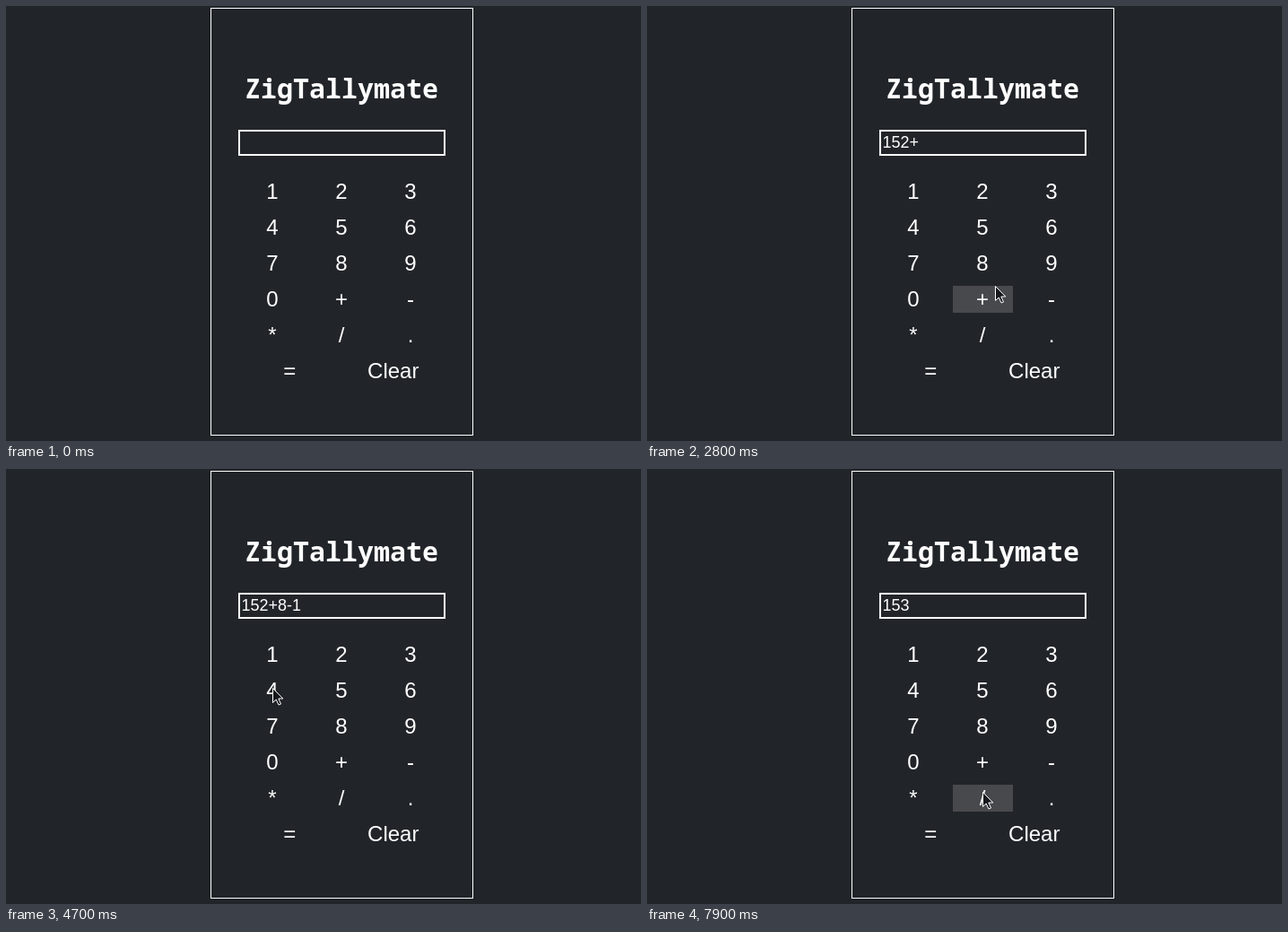
An HTML page for the animation above (8 s loop, 708x485 px).

```html
<!DOCTYPE html>
<html lang="en">
<head>
<meta charset="utf-8">
<title>Calculator</title>
<style>
  html, body { margin: 0; width: 100%; height: 100%; overflow: hidden; background: #212529; }
  svg { display: block; }
  text { fill: #fff; font-family: "Liberation Sans", Arial, sans-serif; white-space: pre; }
  .title { font: bold 30px "Noto Sans Mono", "DejaVu Sans Mono", monospace; }
  .key { font-size: 24px; }
  .entry { font-size: 18px; }
  .frame { fill: none; stroke: #fff; }
</style>
</head>
<body>
<svg id="stage" width="708" height="485" viewBox="0 0 708 485">
  <rect width="708" height="485" fill="#212529"/>
  <rect class="frame" x="228.5" y="2.5" width="292" height="476"/>
  <text class="title" x="374" y="103" text-anchor="middle">ZigTallymate</text>
  <rect class="frame" x="260" y="139" width="229" height="27" stroke-width="2"/>
  <text class="entry" id="entry" x="262.5" y="158"></text>
  <rect id="glow" height="30" fill="#48494d"/>
  <g id="keys"></g>
  <path id="pointer" d="M.5 .5V16.5L4.2 13L7 19L9.5 18L6.8 12H11.8Z"
        fill="#16181b" stroke="#fff" stroke-linejoin="round"/>
</svg>
<script>
const LOOP = 8000, STEP = 100;
const LEFT = 264, TOP = 192, WIDTH = 221, GAP = 10, HEIGHT = 30;
const $ = id => document.getElementById(id);
const entry = $('entry'), glow = $('glow'), pointer = $('pointer');

const rows = ['123', '456', '789', '0+-', '*/.'].map(r => [...r]);
rows.push(['=', 'Clear']);

const keys = rows.flatMap((row, r) => {
  const w = (WIDTH + GAP) / row.length - GAP;
  return row.map((label, c) => ({ label, w, x: LEFT + c * (w + GAP), y: TOP + r * (HEIGHT + GAP) }));
});

for (const k of keys) {
  const t = document.createElementNS('http://www.w3.org/2000/svg', 'text');
  t.setAttribute('class', 'key');
  t.setAttribute('x', k.x + k.w / 2 - 0.5);
  t.setAttribute('y', k.y + 23);
  t.setAttribute('text-anchor', 'middle');
  t.textContent = k.label;
  $('keys').append(t);
}

// Each hop eases to a stop; its key is pressed when the next hop leaves. Times are in steps.
const ENTER = 2, HOME = { x: 29, y: 264 };
const hops = [
  { leave: 3, arrive: 6, x: 306, y: 217, key: '1' },
  { leave: 10, arrive: 14, x: 374, y: 240, key: '5' },
  { leave: 15, arrive: 17, x: 383, y: 219, key: '2' },
  { leave: 19, arrive: 24, x: 382, y: 329, key: '+' },
  { leave: 26, arrive: 30, x: 394, y: 295, key: '8' },
  { leave: 32, arrive: 38, x: 443, y: 322, key: '-' },
  { leave: 38, arrive: 43, x: 304, y: 211, key: '1' },
  { leave: 45, arrive: 47, x: 297, y: 244, key: '' },
  { leave: 47, arrive: 50, x: 300, y: 363, key: '*' },
  { leave: 53, arrive: 56, x: 308, y: 290, key: '7' },
  { leave: 57, arrive: 60, x: 363, y: 331, key: '' },
  { leave: 60, arrive: 64, x: 318, y: 398, key: '=' },
  { leave: 66, arrive: 67, x: 319, y: 399, key: '' },
  { leave: 73, arrive: 78, x: 374, y: 360, key: '' }
];

const ease = f => f < 0.5 ? 4 * f ** 3 : 1 - 4 * (1 - f) ** 3;

function place(step) {
  if (step < ENTER) return null;
  let { x, y } = HOME;
  for (const h of hops) {
    if (step <= h.leave) break;
    const f = ease(Math.min(1, (step - h.leave) / (h.arrive - h.leave)));
    x += (h.x - x) * f;
    y += (h.y - y) * f;
  }
  return { x: Math.round(x), y: Math.round(y) };
}

function keyAt(p) {
  return p && keys.find(k => p.x >= k.x && p.x < k.x + k.w && p.y >= k.y && p.y < k.y + HEIGHT);
}

function typed(step) {
  const text = hops.filter((h, i) => hops[i + 1]?.leave <= step).map(h => h.key).join('');
  return text.endsWith('=') ? '153' : text;
}

function show(el, on) {
  el.setAttribute('visibility', on ? 'visible' : 'hidden');
}

function draw(ms) {
  const step = Math.floor(ms % LOOP / STEP);
  const p = place(step);
  show(pointer, p);
  if (p) pointer.setAttribute('transform', `translate(${p.x},${p.y})`);

  // The highlight trails the pointer by one step
  const k = keyAt(place(step - 1));
  show(glow, k);
  if (k) for (const a of ['x', 'y']) glow.setAttribute(a, k[a]);
  if (k) glow.setAttribute('width', k.w);

  entry.textContent = typed(step);
}

let start;
function loop(now) {
  start ??= now;
  draw(Math.max(0, now - start));
  requestAnimationFrame(loop);
}
draw(0);
requestAnimationFrame(loop);
</script>
</body>
</html>
```
